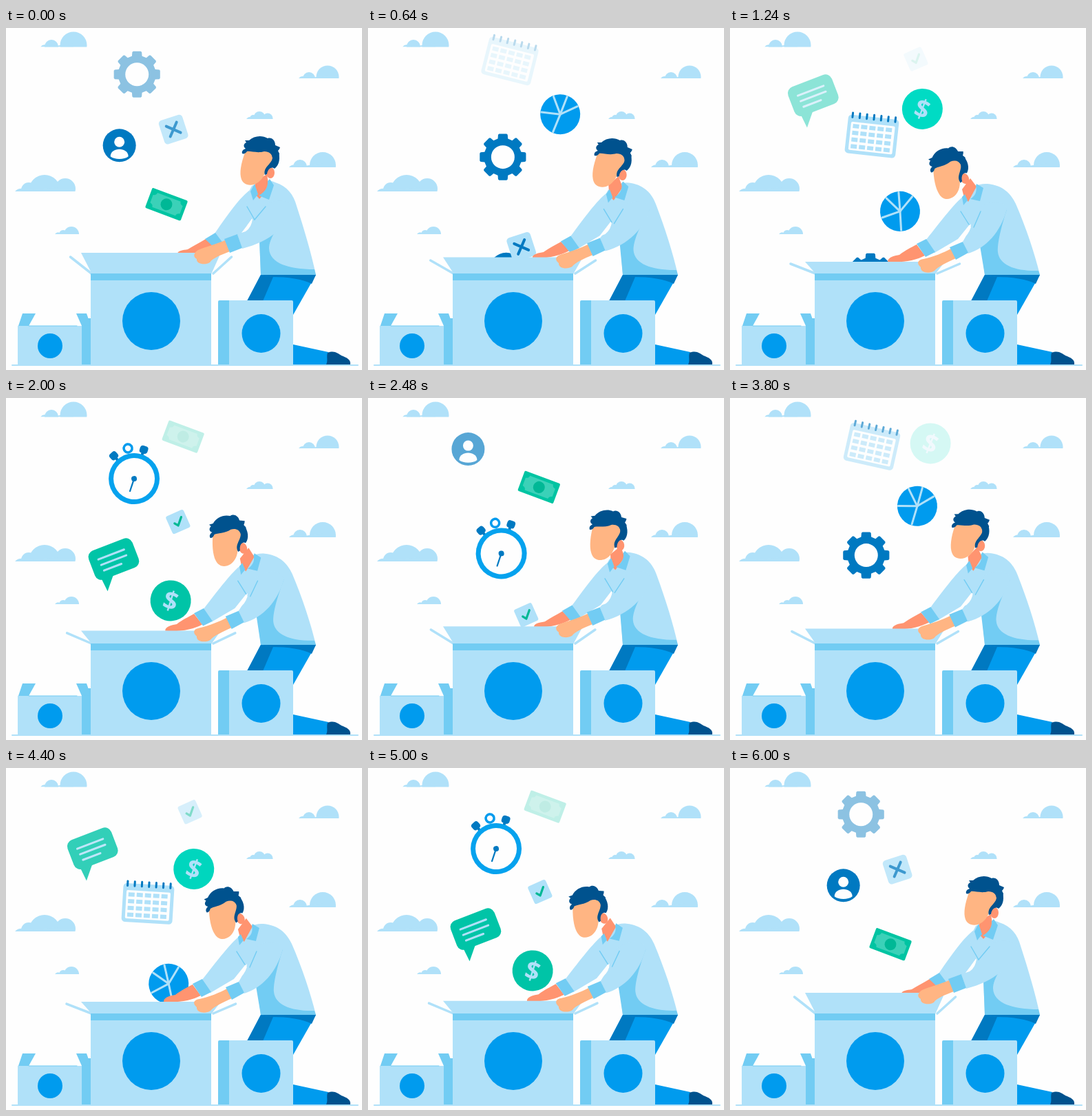
An HTML page with a canvas for the animation above (6.04 s loop, 517 by 496 pixels).

```html
<!DOCTYPE html>
<html lang="en">
<head>
<meta charset="utf-8">
<title>Packing boxes</title>
<style>
html, body { margin: 0; width: 517px; height: 496px; overflow: hidden; background: #fefefe; }
canvas { display: block; }
</style>
</head>
<body>
<canvas id="stage" width="517" height="496"></canvas>
<script>
const stage = document.getElementById('stage').getContext('2d');
const layer = document.createElement('canvas').getContext('2d');
layer.canvas.width = 517;
layer.canvas.height = 496;
let c = stage;

const LOOP = 6040, CYCLE = 3000, STEP = 40;
const PALE = '#b0e1f9', SKY = '#72ccf3', BLUE = '#009bee', DEEP = '#0079c1', NAVY = '#00528e',
  SKIN = '#ffb583', BLUSH = '#ff9470', GREEN = '#00c4a7', PAPER = '#fefefe';
const TAU = Math.PI * 2, RAD = Math.PI / 180;
const clamp = v => Math.max(0, Math.min(1, v));
const lerp = (a, b, p) => a + (b - a) * p;

// ---------- drawing helpers ----------
function disc(x, y, r, color, ry = r) {
  c.beginPath();
  c.ellipse(x, y, r, ry, 0, 0, TAU);
  c.fillStyle = color;
  c.fill();
}
function rect(x, y, w, h, color, r = 0) {
  c.beginPath();
  c.roundRect(x, y, w, h, r);
  c.fillStyle = color;
  c.fill();
}
function line(color, width, ...p) {
  c.beginPath();
  for (let i = 0; i < p.length; i += 2) c.lineTo(p[i], p[i + 1]);
  c.strokeStyle = color;
  c.lineWidth = width;
  c.lineCap = c.lineJoin = 'round';
  c.stroke();
}
function poly(color, ...p) {
  c.beginPath();
  for (let i = 0; i < p.length; i += 2) c.lineTo(p[i], p[i + 1]);
  c.closePath();
  c.fillStyle = color;
  c.fill();
}
function shape(color, d) {
  c.fillStyle = color;
  c.fill(new Path2D(d));
}
// Blends two path strings that share the same commands.
function morph(color, a, b, p) {
  const to = b.match(/-?[\d.]+/g);
  let i = 0;
  shape(color, a.replace(/-?[\d.]+/g, n => lerp(+n, +to[i++], p).toFixed(2)));
}

// ---------- scenery ----------
function cloud(x, right, base, bumps) {
  c.save();
  c.beginPath();
  c.rect(x, 0, right - x, base);
  c.clip();
  for (const [bx, by, r] of bumps) disc(bx, by, r, PALE);
  const [fx, fy, fr] = bumps[0], last = bumps[bumps.length - 1];
  c.beginPath();
  c.moveTo(x, base);
  c.quadraticCurveTo(x + 4, base - 5, fx - fr * 0.7, fy - fr * 0.2);
  c.lineTo(fx, fy);
  c.lineTo(last[0], last[1] - 3);
  c.lineTo(last[0], base);
  c.fill();
  c.restore();
}
function scenery() {
  cloud(50, 118, 27.5, [[66, 27, 10], [98, 25, 19.5]]);
  cloud(425, 484, 73, [[440, 73, 9], [467, 71, 16.5]]);
  cloud(349, 388, 132, [[359, 131, 5], [368, 129, 8], [380, 131, 7.5]]);
  cloud(411, 479, 202, [[427, 201, 10], [460, 199, 19]]);
  cloud(13, 101, 237, [[33, 235, 11], [56, 236, 23], [86, 233, 15]]);
  cloud(71, 106, 299, [[83, 299, 6], [95, 299, 11]]);
  line(PALE, 2, 9, 489, 511, 489);
}
function smallBox() {
  poly(SKY, 110, 432, 112, 421, 123, 421, 123, 488, 110, 488);
  poly(SKY, 102, 414, 117, 414, 123, 431, 110, 432);
  poly(SKY, 24, 414, 43, 414, 33, 432, 18, 432);
  rect(17, 432, 93, 56, PALE);
  line(SKY, 1, 33, 432, 103, 432);
  disc(64, 461, 18, BLUE);
}
function bigBox(p) {
  const lid = lerp(326, 339, p);
  line(PALE, 3.5, lerp(93.5, 88, p), lerp(332, 342, p), 124, 356);
  line(PALE, 3.5, lerp(327.5, 333.5, p), lerp(332, 342, p), 301, 356);
  poly(PALE, 109, lid, 312, lid, 298, 357, 125, 357);
  rect(123, 356, 175, 132, PALE);
  rect(123, 356, 175, 10, SKY);
  disc(211, 425, 42, BLUE);
}
function rightBox() {
  rect(308, 395, 30, 93, SKY, [2, 0, 0, 0]);
  rect(324, 395, 93, 93, PALE, [0, 2, 0, 0]);
  disc(370.5, 443, 28, BLUE);
}

// ---------- falling items ----------
function gear() {
  c.beginPath();
  for (let i = 0; i < 8; i++) {
    const a = i * TAU / 8 - TAU / 4;
    for (const [r, w] of [[27.5, -0.27], [33, -0.21], [34, -0.16], [34, 0.16], [33, 0.21], [27.5, 0.27]])
      c.lineTo(r * Math.cos(a + w), r * Math.sin(a + w));
  }
  c.closePath();
  c.moveTo(17, 0);
  c.arc(0, 0, 17, 0, TAU);
  c.fillStyle = DEEP;
  c.fill('evenodd');
}
function crossCard() {
  rect(-18, -18, 36, 36, PALE, 5);
  line(DEEP, 4, -8.5, -7.5, 8.5, 7.5);
  line(DEEP, 4, 7.5, -8.5, -7.5, 8.5);
}
function avatar() {
  disc(0, 0, 24, DEEP);
  disc(0, -5, 7.5, PAPER);
  shape(PAPER, 'M-13 16C-13 2 13 2 13 16C7 21 -7 21 -13 16Z');
}
function money() {
  rect(-27.5, -15.5, 55, 31, '#00c4a2', 2);
  shape('#3bd1b8', 'M-18 -11L18 -11Q18 -7 23 -6L23 6Q18 7 18 11L-18 11Q-18 7 -23 6L-23 -6Q-18 -7 -18 -11Z');
  disc(0, 0, 8.5, '#00b896');
}
function watch() {
  for (const s of [-1, 1]) {
    c.save();
    c.rotate(s * 30 * RAD);
    line(DEEP, 4, 0, -36, 0, -42);
    rect(-6, -50, 12, 11, DEEP, 4);
    c.restore();
  }
  c.beginPath();
  c.arc(0, -45, 6, 0, TAU);
  c.strokeStyle = BLUE;
  c.lineWidth = 3.5;
  c.stroke();
  disc(0, 0, 37, '#05a2ee');
  disc(0, 0, 30, PAPER);
  line(DEEP, 2.2, 0, 0, -9.5, 16.5);
  disc(0, 0, 4, DEEP);
}
function checkCard() {
  rect(-14, -14, 28, 28, PALE, 3);
  line('#00b894', 3.2, -5.5, 0, -2, 5, 7, -4.5);
}
function chat() {
  shape(GREEN, 'M-27 18L-25 40L-8 20Z');
  rect(-34, -23, 68, 45, GREEN, 10);
  line(PALE, 3, -21, -8, 19, -8);
  line(PALE, 3, -20, 1, 19, 1);
  line(PALE, 3, -19, 10, 8, 10);
}
function coin(d) {
  const q = clamp((d - 50) / 150);
  disc(0, 0, 29.5, `rgb(0,${lerp(220, 196, q)},${lerp(197, 167, q)})`);
  c.fillStyle = PALE;
  c.font = 'bold 37px "Open Sans", sans-serif';
  c.textAlign = 'center';
  c.textBaseline = 'alphabetic';
  c.fillText('$', 0, 13);
}
function calendar() {
  rect(-37, -28, 74, 56, PALE, 5);
  rect(-32, -18, 64, 41, PAPER, 2);
  for (let r = 0; r < 4; r++)
    for (let k = 0; k < 5; k++) rect(-29 + k * 12, -15 + r * 9.8, 9, 6, PALE);
  for (let k = 0; k < 7; k++) line(DEEP, 3, -31 + k * 10.4, -31, -31 + k * 10.4, -24.5);
}
function pie() {
  disc(0, 0, 29, BLUE);
  for (const a of [91, 165, 228, 270, 314])
    line(PALE, 3, 0, 0, 27.5 * Math.cos(a * RAD), 27.5 * Math.sin(a * RAD));
}

// at: start time, lean: sideways drift per pixel fallen, wait: delay before fading in
const items = [
  { draw: gear, at: 2650, x: 189, y: 41, lean: 0.047, wait: 150, rot: 0 },
  { draw: pie, at: 0, x: 295.5, y: 54, lean: -0.229, wait: 50, rot: 34.4, turn: -0.183 },
  { draw: calendar, at: 300, x: 206, y: 23, lean: 0, wait: 220, rot: 16, turn: -0.072 },
  { draw: coin, at: 690, x: 292, y: 62, lean: -0.228, wait: 40, rot: 22, turn: -0.02 },
  { draw: chat, at: 990, x: 117, y: 83, lean: 0.262, wait: 50, rot: -21 },
  { draw: checkCard, at: 1000, x: 272, y: 31, lean: -0.149, wait: 180, rot: -24 },
  { draw: watch, at: 1355, x: 181, y: 45, lean: 0.07, wait: 50, rot: -11.5 },
  { draw: money, at: 1750, x: 259, y: 41, lean: -0.121, wait: 140, rot: 20.5 },
  { draw: avatar, at: 2085, x: 139, y: 42, lean: 0.2, wait: 100, rot: 0 },
  { draw: crossCard, at: 2180, x: 256, y: 40, lean: -0.12, wait: 480, rot: -18 }
];

// An item is composed on the layer first, so that it fades as one piece.
function drawItem(item, t) {
  const age = (t - item.at + 2 * CYCLE) % CYCLE;
  const d = 0.001667 * Math.pow(age, 1.65), y = item.y + d;
  const alpha = clamp((age - item.wait) / 450);
  if (y > 420 || !alpha) return;
  c = layer;
  c.clearRect(0, 0, 517, 496);
  c.save();
  c.translate(item.x + item.lean * d, y);
  c.rotate((item.rot + (item.turn || 0) * d) * RAD);
  item.draw(d);
  c.restore();
  c = stage;
  c.globalAlpha = alpha;
  c.drawImage(layer.canvas, 0, 0);
  c.globalAlpha = 1;
}

// ---------- man ----------
const KEYS = [0, 800, 1240, 2000, 3000, 3800, 4240, 5000];
// Smooth periodic curve through one value per key time, flat at the extremes.
function pose(vals, t) {
  const n = KEYS.length, span = 2 * CYCLE;
  const time = i => KEYS[(i + n) % n] + Math.floor(i / n) * span;
  const val = i => vals[(i + n) % n];
  const slope = i => {
    const l = val(i) - val(i - 1), r = val(i + 1) - val(i);
    return l * r <= 0 ? 0 : (l + r) / (time(i + 1) - time(i - 1));
  };
  let i = n - 1;
  while (KEYS[i] > t) i--;
  const h = time(i + 1) - time(i), u = (t - time(i)) / h, u2 = u * u, u3 = u2 * u;
  return (2 * u3 - 3 * u2 + 1) * val(i) + (u3 - 2 * u2 + u) * h * slope(i)
    + (3 * u2 - 2 * u3) * val(i + 1) + (u3 - u2) * h * slope(i + 1);
}
function farArm(p) {
  morph(BLUSH, 'M290 306L302 316C285 324 275 328 249 328C248 323 258 322 264 321C272 316 282 311 290 306Z',
    'M271 314L283 330C270 337 250 341 229 339C229 332 240 330 246 329C255 322 262 319 271 314Z', p);
  morph(PALE, 'M353 236C340 246 325 266 303 298L315 313L343 296L362 270Z',
    'M339 244C326 254 308 278 285 307L297 326L331 306L352 280Z', p);
  morph(SKY, 'M304 297L316 313L303 319L289 306Z', 'M285 306L298 325L284 332L271 313Z', p);
}
function legs() {
  poly(BLUE, 370, 358, 450, 358, 417, 416, 400, 416, 350, 396);
  poly(DEEP, 370, 358, 388, 361, 373, 396, 350, 396);
  shape(DEEP, 'M370 358L450 358L444 371C430 364 410 361 386 361Z');
  poly(BLUE, 417, 459, 468, 470, 468, 488, 417, 488);
  shape(NAVY, 'M467 471C477 467 482 472 487 475C494 478 501 480 500 488L465 488C468 482 465 477 467 471Z');
}
function torso(p) {
  morph(PALE, 'M357 229C372 221 384 220 391 224C408 229 418 242 422 258C433 292 443 325 450 358L370 358L368 308L358 280L348 246Z',
    'M340 242C350 230 362 225 374 226C396 228 408 240 415 255C430 290 442 325 450 358L370 358L365 318L349 288L334 252Z', p);
  morph(SKY, 'M417 262C396 285 382 305 382 320C383 341 410 350 448 350L450 358L370 358L368 306L390 285Z',
    'M402 263C394 288 388 312 389 325C391 344 415 353 448 352L450 358L370 358L363 316L380 290Z', p);
  morph(PALE, 'M336 299L358 279L372 258C395 245 415 250 417 262C407 288 385 309 343 320Z',
    'M338 310L350 289L360 262C380 247 400 250 402 263C393 296 372 319 346 327Z', p);
  morph(PAPER, 'M358 276L342 297L348 295Q357 289 358 276Z', 'M350 284L331 307L341 303Q350 295 350 284Z', p);
  const at = (a, b) => lerp(a, b, p);
  line(SKY, 1.4, at(350, 335), at(259, 266), at(361, 347), at(278, 285));
  line(SKY, 1.4, at(377, 364), at(259, 266), at(361, 354), at(278, 289));
}
function nearHand(p) {
  morph(SKIN, 'M320 307L325 324C310 330 300 334 296 340C290 344 276 343 277 335C270 331 274 325 279 322C290 317 305 314 320 307Z',
    'M321 320L328 334C315 340 302 346 297 352C290 357 276 355 277 347C270 341 273 336 281 335C295 332 310 326 321 320Z', p);
  morph(SKY, 'M317 306L336 299L343 319L325 326Z', 'M319 318L338 310L346 326L328 336Z', p);
}
function neck(p) {
  morph(BLUSH, 'M362 222L379 212L382 232L368 248L361 240Z', 'M337 234L349 218L358 230L346 252L340 246Z', p);
  morph(SKY, 'M361 226L355 237L359 250L366 241Z', 'M341 241L337 245L339 257L345 250Z', p);
  morph(SKY, 'M383 219L389 228L382 249L367 243Q381 235 380 222Z', 'M358 226L368 232L363 251L349 248Q360 241 357 229Z', p);
}
function head(x, y, rot) {
  c.save();
  c.translate(362 + x, 203 + y);
  c.rotate(rot * RAD);
  c.translate(-362, -203);
  shape(NAVY, 'M375 174L391 172L397 182L393 199L382 204L376 213Z');
  disc(384, 210, 6, BLUSH, 8);
  shape(SKIN, 'M349 176C343 190 339 206 341 216C343 227 352 229 360 227C369 224 376 215 377 205C381 202 387 196 387 188L384 177Z');
  shape(NAVY, 'M343 182C342 178 345 176 348 175C344 172 345 168 349 166L347 163L353 163C360 156 372 155 380 160C386 158 391 163 391 170L398 173C397 176 396 177 395 178C399 188 397 199 390 204C386 200 380 204 379 212L376 213C373 202 385 198 387 189C387 183 382 179 375 179C365 182 355 178 350 179C348 182 345 183 343 182Z');
  c.restore();
}

const BEND = [0, 0.66, 1, 0.89, 0, 0.66, 1, 0.91];
const HEAD_X = [0, -20, -44, -41, 0, -20, -44, -43];
const HEAD_Y = [0, 5, 18, 14.5, 0, 5, 18, 16];
const HEAD_ROT = [0, -2, -24, -17, 0, -2, -24, -20];

function render(t) {
  c.fillStyle = PAPER;
  c.fillRect(0, 0, 517, 496);
  const p = pose(BEND, t);
  scenery();
  smallBox();
  for (const item of items) drawItem(item, t);
  farArm(p);
  bigBox(p);
  legs();
  torso(p);
  nearHand(p);
  neck(p);
  head(pose(HEAD_X, t), pose(HEAD_Y, t), pose(HEAD_ROT, t));
  rightBox();
}
const start = performance.now();
function tick() {
  const ms = Math.max(0, performance.now() - start) % LOOP;
  render(Math.floor(ms / STEP) * STEP % (2 * CYCLE));
  requestAnimationFrame(tick);
}
tick();
</script>
</body>
</html>
```
